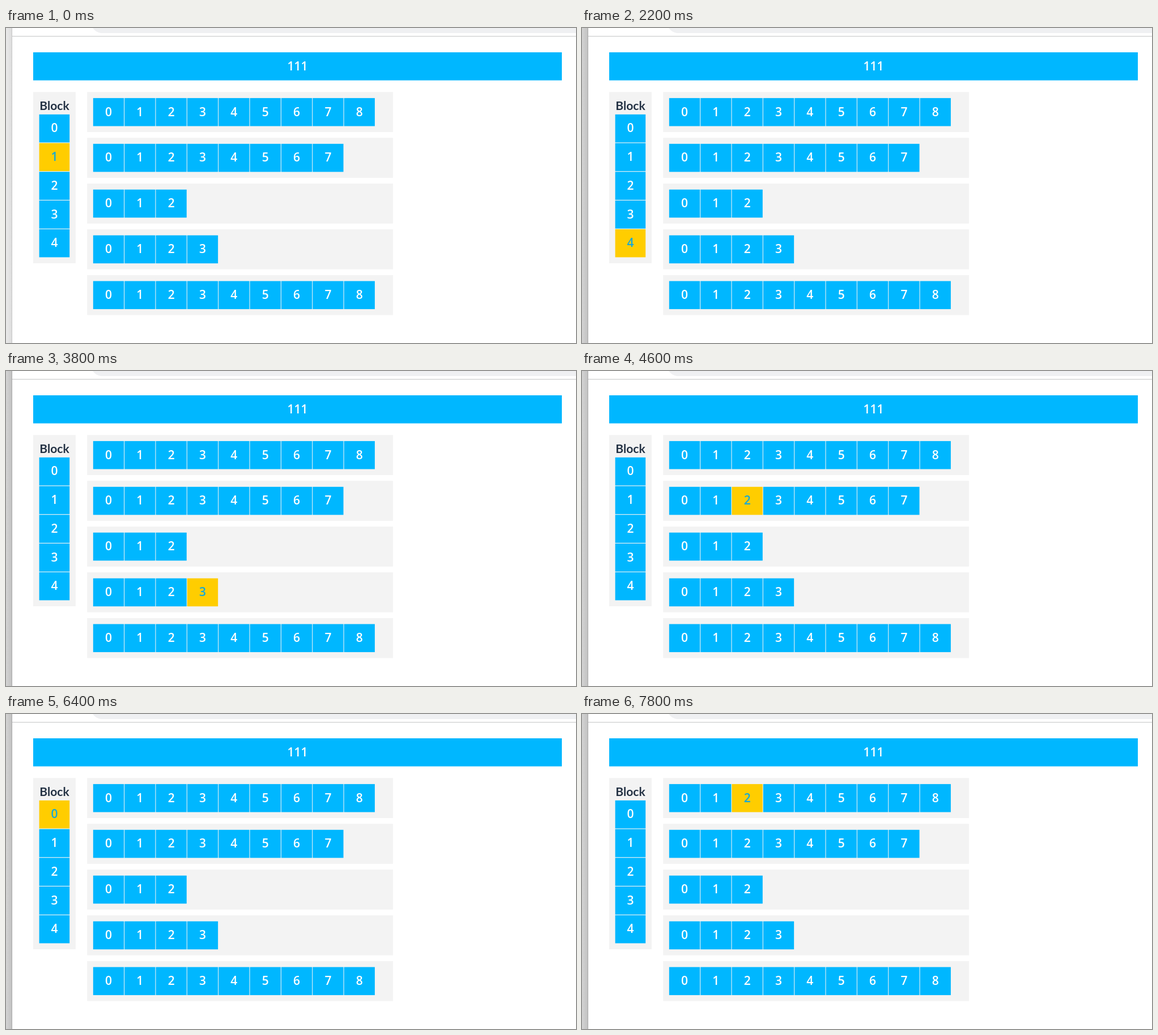
These frames come from a looping animation (1006x557 px, 8 s). An HTML page:

```html
<!DOCTYPE html>
<html lang="en">
<head>
<meta charset="utf-8">
<title>Focus navigation</title>
<style>
  html, body { margin: 0; width: 100%; height: 100%; overflow: hidden; background: #fff; }
  svg { display: block; width: 1006px; height: 557px; }
  text { font: 600 21px "Open Sans", "Noto Sans", sans-serif; text-anchor: middle; fill: #fff; }
  .title { font: 700 21px Lato, sans-serif; fill: #243244; }
  .panel { fill: #f3f3f3; }
  .cell rect { fill: #00b7ff; }
  .focused rect { fill: #ffcd00; }
  .focused text { fill: #12a9da; }
</style>
</head>
<body>
<svg id="stage" viewBox="0 0 1006 557">
  <defs>
    <linearGradient id="edge">
      <stop id="edgeStart" offset="0"/>
      <stop id="edgeEnd" offset="1"/>
    </linearGradient>
  </defs>
  <rect width="10" height="557" fill="url(#edge)"/>
  <rect id="edgeLine" x="10" width="1" height="557"/>
  <rect x="150" y="-31" width="900" height="40" rx="20" fill="#eff0f2"/>
  <rect x="11" y="14" width="995" height="1.2" fill="#cbcccd"/>
</svg>
<script>
const stage = document.getElementById('stage');
const cells = {};

function add(parent, tag, attributes, content = '') {
  const node = document.createElementNS('http://www.w3.org/2000/svg', tag);
  for (const [name, value] of Object.entries(attributes)) node.setAttribute(name, value);
  node.textContent = content;
  return parent.appendChild(node);
}

function addPanel(x, y, width, height) {
  add(stage, 'rect', { class: 'panel', x, y, width, height });
}

function addCell(key, label, x, y, width) {
  const cell = cells[key] = add(stage, 'g', { class: 'cell' });
  add(cell, 'rect', { x, y, width, height: 49.6 });
  add(cell, 'text', { x: x + width / 2, y: y + 31.6 }, label);
}

addCell('header', '111', 48, 43, 933);

addPanel(48, 113.3, 75, 302.7);
add(stage, 'text', { class: 'title', x: 85.5, y: 145.4 }, 'Block');
for (let i = 0; i < 5; i++) addCell('block' + i, i, 58.6, 152.8 + 50.75 * i, 53.6);

[9, 8, 3, 4, 9].forEach((count, row) => {
  const top = 113.3 + 80.9 * row;
  addPanel(143.3, top, 539.7, 70.7);
  for (let col = 0; col < count; col++) {
    addCell(`${row},${col}`, col, 153.8 + 55.35 * col, top + 10.6, 54.3);
  }
});

// Moments at which the focus jumps, and where it lands.
const moves = [
  [0, 'block1'], [1600, 'block2'], [1900, 'block3'], [2200, 'block4'],
  [2500, 'block3'], [2700, 'block2'], [3000, 'block1'],
  [3300, '4,4'], [3800, '3,3'], [4100, '2,2'], [4400, '1,2'],
  [4800, '0,2'], [5100, '0,3'], [5400, '0,4'],
  [6000, 'header'], [6300, 'block0'],
  [6900, '2,2'], [7500, '1,2'], [7700, '0,2']
];

function paint(id, property, color) {
  document.getElementById(id).style[property] = color;
}

const start = performance.now();

function draw() {
  const time = (performance.now() - start) % 8000;
  const focus = moves.filter(([at]) => at <= time).pop()[1];
  for (const key in cells) cells[key].classList.toggle('focused', key === focus);

  const dark = time >= 700;
  paint('edgeStart', 'stopColor', dark ? '#d3d3d3' : '#e9e9e9');
  paint('edgeEnd', 'stopColor', dark ? '#c2c2c2' : '#dddddd');
  paint('edgeLine', 'fill', dark ? '#a9a9a9' : '#c6c6c6');
  requestAnimationFrame(draw);
}
draw();
</script>
</body>
</html>
```
